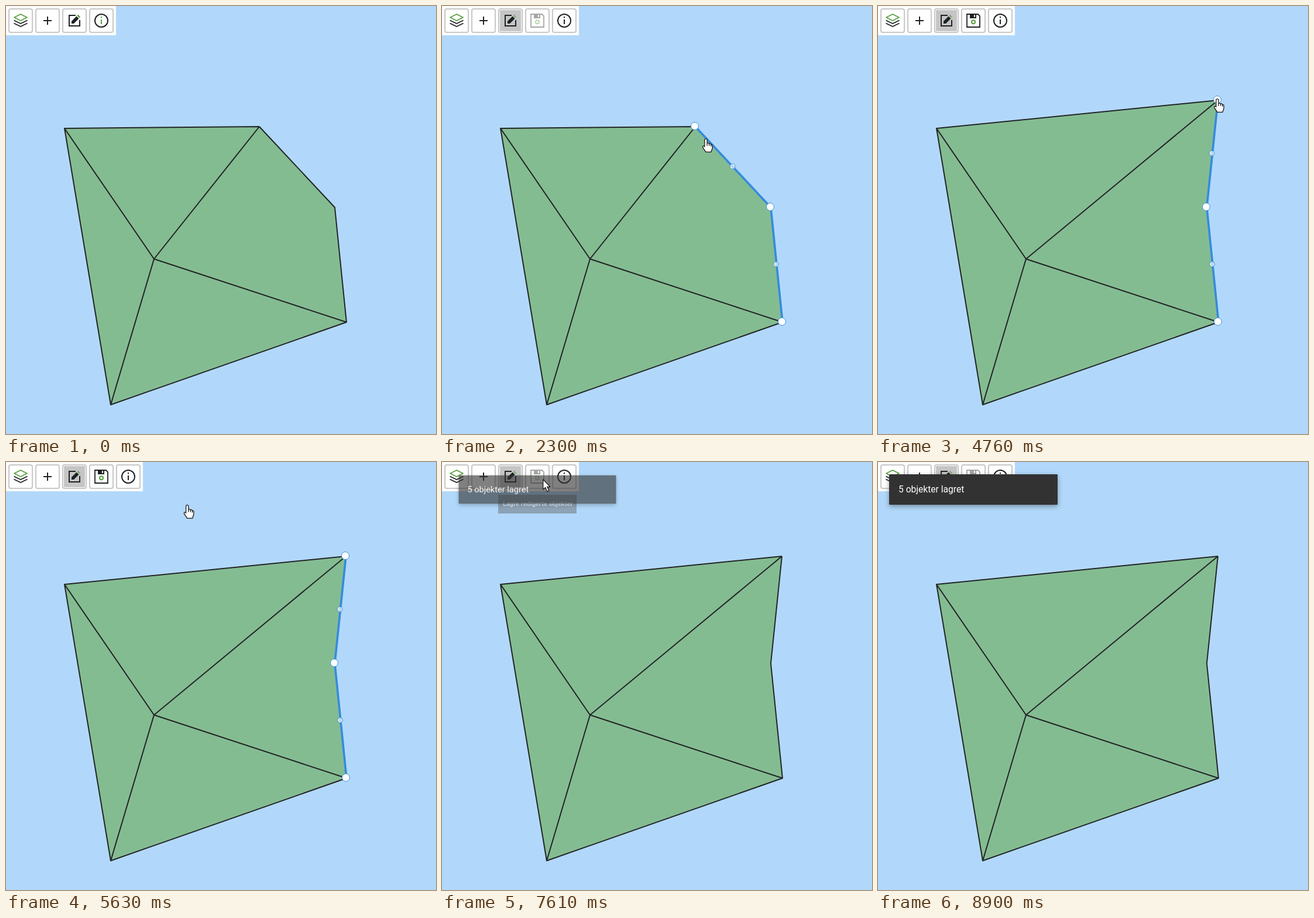
An HTML page for the animation above (9.5 s loop, 735 px wide and 731 px high).

```html
<!DOCTYPE html>
<html lang="no">
<head>
<meta charset="utf-8">
<style>
  html, body { margin: 0; width: 100%; height: 100%; overflow: hidden; background: #b1d8fa; }
  svg { display: block; width: 735px; height: 731px; }
  text { font-family: Roboto, Arial, sans-serif; fill: #fff; }
  .icon { fill: none; stroke: #1e2224; stroke-width: 2; }
  .solid { fill: #1e2224; stroke: none; }
  .green { stroke: #559f3b; }
  .off { opacity: .4; }
  .button { fill: #fff; stroke: #c8c8c8; stroke-width: 2; }
  .edge { fill: none; stroke: #222426; stroke-width: 2; stroke-linejoin: round; }
  .edge.active { stroke: #348bdc; stroke-width: 3.6; }
  .tip rect { fill: #616161; fill-opacity: .9; }
  .tip text { font-size: 11px; font-weight: 700; }
  .pointer { fill: #fff; stroke: #111; stroke-width: 1.2; stroke-linejoin: round; }
  #snack { transform-origin: 163px 47px; }
  #snack rect { fill: #323232; filter: drop-shadow(0 3px 4px rgba(0, 0, 0, .35)); }
  #glow { fill: #fff600; mix-blend-mode: multiply; opacity: .72; }
  #handles circle { fill: #fff; stroke: #3a8ee0; }
</style>
</head>
<body>
<svg viewBox="0 0 735 731">
  <rect width="735" height="731" fill="#b1d8fa"/>
  <path id="area" fill="#84bc92"/>
  <path id="edges" class="edge"/>
  <path id="line" class="edge"/>
  <g id="handles"></g>

  <rect id="bar" height="50" fill="#fcfcfc"/>
  <g id="buttons"></g>
  <rect id="selected" x="99" y="7" width="36" height="36" fill="#c5c5c5"/>
  <g class="icon" stroke-linejoin="round">
    <path class="green" stroke-width="1.8" d="M14 19.5L25 14 36 19.5 25 25Z"/>
    <path stroke-width="1.8" d="M13.5 24.5L25 30 36.5 24.5M13.5 29.5L25 35 36.5 29.5"/>
  </g>
  <path class="icon" d="M64 25H78M71 18V32"/>
  <g class="icon">
    <path d="M119 16H108V34H126V24"/>
    <path class="solid" d="M112 30V26L120.500 17.500 124.500 21.500 116 30Z"/>
    <path id="nib" class="green" stroke-width="2.600" d="M122.300 15.700L126.300 19.700"/>
  </g>
  <g id="save" class="icon">
    <path stroke-width="1.8" d="M152 14H171L174 17V36H152Z"/>
    <path class="solid" d="M157 13H168V21H157ZM164 14.500V19H166V14.500Z" fill-rule="evenodd"/>
    <circle class="green" cx="163" cy="27.300" r="3"/>
  </g>
  <path id="spinner" class="icon green" d="M163 15A10 10 0 1 1 153 25"/>
  <g id="info" class="icon">
    <circle cx="163" cy="25" r="11"/>
    <path id="letter" d="M163 18V20.200M163 23V31"/>
  </g>

  <g id="editTip" class="tip">
    <rect x="73" y="56" width="87" height="32"/>
    <text x="81" y="75">Rediger objekt</text>
  </g>
  <g id="saveTip" class="tip">
    <rect x="96" y="56" width="134" height="32"/>
    <text x="104" y="75">Lagre redigerte objekter</text>
  </g>
  <g id="snack">
    <rect x="19" y="21" width="288" height="52" rx="1"/>
    <text x="35" y="52" font-size="15.600">5 objekter lagret</text>
  </g>

  <circle id="glow" r="11.500"/>
  <g id="cursor" class="pointer">
    <path id="hand" transform="scale(1.060)" d="M-2 2Q0 -1 2 2V8Q4 6.500 5.300 8.700Q7.300 7.700 8.200 9.700Q10.500 9.500 10.500 12V16L8.500 22H0L-5 14.500Q-5.500 11 -2 13.500ZM2 8V12M5.300 8.700V12M8.200 9.700V13"/>
    <path id="arrow" d="M0 0V17L4 13.500 7 20.500 10 19 7 12.500H12Z"/>
  </g>
</svg>
<script>
const LOOP = 9500;
const A = [100, 209], B = [433, 206], B2 = [581, 161], C = [562, 344];
const D = [582, 540], E = [179, 681], M = [253, 432];
// Cursor stops: time, x, y
const stops = [
  [130, 637, 636], [600, 126, 28], [1200, 126, 28], [1930, 451, 226],
  [2450, 451, 226], [2780, 432, 203], [2980, 432, 203], [3180, 580, 158],
  [5290, 580, 158], [5850, 171, 29], [7540, 171, 29], [7950, 194, 40],
  [8190, 194, 40], [8500, 633, 500], [8860, 705, 706]
];
const presses = [[660, 860], [2160, 2300], [2980, 3640], [6190, 6320]];

const $ = id => document.getElementById(id);
const set = (el, attrs) => { for (const k in attrs) el.setAttribute(k, attrs[k]); };
const show = (id, on) => $(id).setAttribute('display', on ? 'inline' : 'none');
const clamp = v => Math.max(0, Math.min(1, v));
const ease = v => v * v * (3 - 2 * v);
const ramp = (t, from, to) => clamp((t - from) / (to - from));
const mix = (p, q, k) => p.map((v, i) => v + (q[i] - v) * k);
const path = (...pts) => 'M' + pts.join('L');

function add(parent, tag, attrs) {
  const el = document.createElementNS('http://www.w3.org/2000/svg', tag);
  set(el, attrs);
  return $(parent).appendChild(el);
}

const buttons = [0, 1, 2, 3, 4].map(i => add('buttons', 'rect',
  { class: 'button', x: 5 + 46 * i, y: 5, width: 40, height: 40, rx: 3 }));
const handles = [6.5, 6.5, 6.5, 4.5, 4.5].map(r => add('handles', 'circle',
  { r, 'fill-opacity': r > 5 ? 1 : .65 }));

function cursorAt(t) {
  const i = stops.findIndex(s => s[0] > t);
  if (i < 1) return stops[i ? stops.length - 1 : 0].slice(1);
  const p = stops[i - 1], q = stops[i];
  return mix(p.slice(1), q.slice(1), ease(ramp(t, p[0], q[0])));
}

function drawMap(t) {
  const corner = t < 4760 ? B : B2;
  const vertex = mix(B, B2, ease(ramp(t, 2980, 3180)));
  const editing = t >= 2230 && t < 6320;
  const active = t >= 1900 && t < 6320 || t >= 8430 && t < 8560;
  set($('area'), { d: path(A, corner, C, D, E) });
  set($('edges'), { d: path(corner, A, E, D, M, A) + path(corner, M, E) });
  set($('line'), { d: path(vertex, C, D), class: active ? 'edge active' : 'edge' });
  show('handles', editing);
  [vertex, C, D, mix(vertex, C, .5), mix(C, D, .5)].forEach(([x, y], i) =>
    set(handles[i], { cx: x - 1, cy: y - 1 }));
}

function drawBar(t) {
  const edit = t >= 860, saving = t >= 6320 && t < 7480;
  set($('bar'), { width: edit ? 234 : 188 });
  show('selected', edit);
  show('save', edit && !saving);
  show('spinner', saving);
  set($('spinner'), { transform: `rotate(${(t - 6320) * .45} 163 25)` });
  set($('save'), { class: t >= 4760 && t < 6320 ? 'icon' : 'icon off' });
  set($('info'), { transform: `translate(${edit ? 46 : 0})` });
  set($('letter'), { class: edit ? '' : 'green' });
  set($('nib'), { opacity: edit ? .6 : 1 });
  set(buttons[3], { style: t >= 5800 && t < 7540 ? 'fill:#f5f5f5' : '' });
  set(buttons[4], { display: edit ? 'inline' : 'none' });
}

function drawOverlays(t) {
  set($('editTip'), { opacity: ramp(t, 790, 930) * (1 - ramp(t, 1270, 1400)) });
  set($('saveTip'), { opacity: ramp(t, 5850, 6000) * (1 - ramp(t, 7540, 7680)) });
  const pop = ramp(t, 7500, 7680);
  set($('snack'), { opacity: pop, style: `transform:scale(${.8 + .2 * ease(pop)})` });

  const [x, y] = cursorAt(t);
  const overSnack = t >= 7540 && x < 307 && y < 73;
  show('cursor', t >= 130 && t < 8860);
  show('hand', !overSnack);
  show('arrow', overSnack);
  set($('cursor'), { transform: `translate(${x} ${y})` });
  show('glow', presses.some(([from, to]) => t >= from && t < to));
  set($('glow'), { cx: x - 1, cy: y + 2 });
}

function frame(now) {
  const t = now % LOOP;
  drawMap(t);
  drawBar(t);
  drawOverlays(t);
  requestAnimationFrame(frame);
}
frame(0);
</script>
</body>
</html>
```
